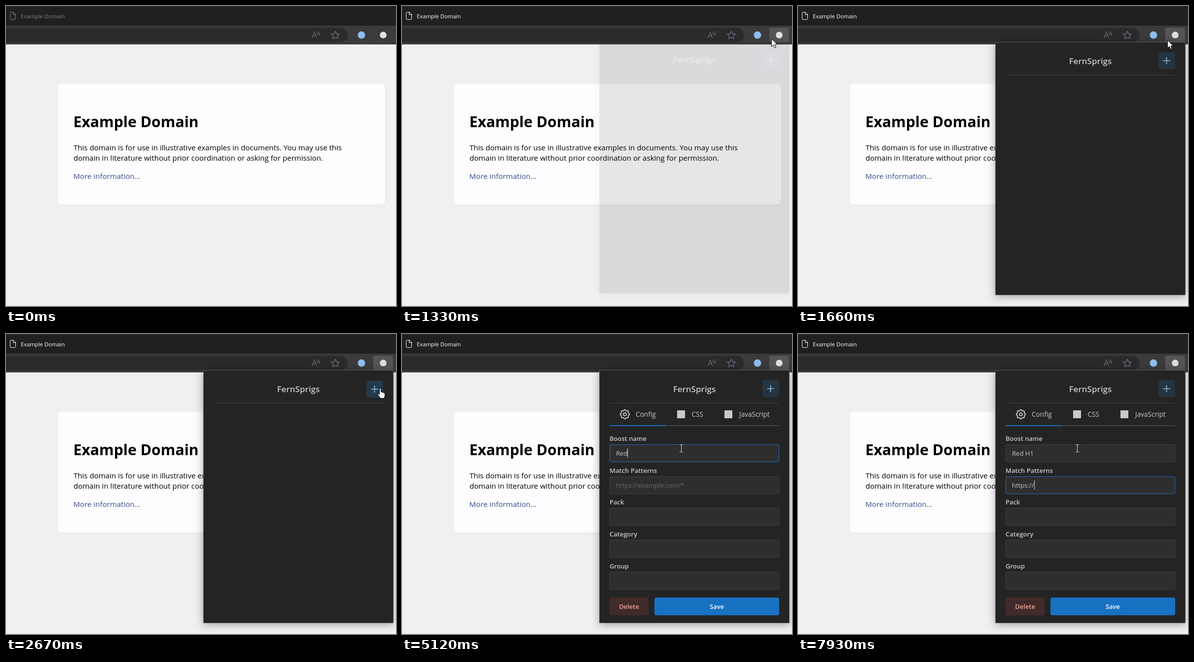
An HTML page with a canvas for the animation above (7.99 s loop, 791 by 609 pixels).

```html
<!DOCTYPE html>
<html lang="en">
<head>
<meta charset="utf-8">
<title>Example Domain</title>
<style>
html, body { margin: 0; width: 791px; height: 609px; overflow: hidden; background: #f0f0f2; }
canvas { display: block; }
</style>
</head>
<body>
<canvas id="stage" width="791" height="609"></canvas>
<script>
const W = 791, H = 609, LOOP = 7990;
const stage = document.getElementById('stage').getContext('2d');
const popup = document.createElement('canvas');
popup.width = W;
popup.height = H;
const pop = popup.getContext('2d');

const LIGHT = '#c9c9c9', LINE = '#424242', BLUE = '#1971c2';

// The picture only changes at these moments
const span = (a, b, n) => Array.from({ length: n }, (_, i) => a + (b - a) * i / (n - 1));
const TICKS = [
  0, ...span(650, 1060, 7),
  1250, 1330, 1400, 1450, ...span(1530, 2000, 8),
  ...span(2070, 2670, 8), 2730, 2790,
  ...span(2870, 3590, 12), 3670, 3730, 3790, 6140, 6190
];
const NAME_KEYS = [4720, 5000, 5120, 5260, 5520, 5800];
const URL_KEYS = [6650, 6790, 6930, 7130, 7270, 7470, 7730, 7930];

// Pointer path: time, x, y
const PATH = [
  [640, 796, 72], [1060, 749, 67], [1330, 749, 66], [1450, 748, 66], [1530, 748, 67],
  [1930, 757, 97], [2330, 756, 107], [2590, 759, 110], [2730, 759, 110],
  [2790, 752, 106], [3590, 566, 232]
];

const snap = t => TICKS.reduce((last, k) => k <= t ? k : last, 0);
const ramp = (t, a, b) => Math.min(1, Math.max(0, (t - a) / (b - a)));
const ease = p => p * p * (3 - 2 * p);
const typed = (str, keys, t) => str.slice(0, keys.filter(k => k <= t).length);

function mix(a, b, p) {
  const part = (c, i) => parseInt(c.slice(i, i + 2), 16);
  const ch = i => Math.round(part(a, i) + (part(b, i) - part(a, i)) * p);
  return `rgb(${ch(1)},${ch(3)},${ch(5)})`;
}

function pointerAt(t) {
  const last = PATH[PATH.length - 1];
  if (t >= last[0]) return { x: last[1], y: last[2] };
  const i = Math.max(1, PATH.findIndex(k => k[0] > t));
  const [t0, x0, y0] = PATH[i - 1], [t1, x1, y1] = PATH[i];
  const p = ease(ramp(t, t0, t1));
  return { x: Math.round(x0 + (x1 - x0) * p), y: Math.round(y0 + (y1 - y0) * p) };
}

function text(c, str, x, y, size, color, weight = 400, align = 'left') {
  c.font = `${weight} ${size}px "Open Sans", "Noto Sans", sans-serif`;
  c.textAlign = align;
  c.fillStyle = color;
  c.fillText(str, x, y);
}

function rect(c, x, y, w, h, color, r = 0) {
  c.beginPath();
  c.roundRect(x, y, w, h, r);
  c.fillStyle = color;
  c.fill();
}

function disc(c, x, y, r, color) {
  c.beginPath();
  c.arc(x, y, r, 0, Math.PI * 2);
  c.fillStyle = color;
  c.fill();
}

function stroke(c, path, color, width = 1, x = 0, y = 0) {
  c.save();
  c.translate(x, y);
  c.strokeStyle = color;
  c.lineWidth = width;
  c.lineJoin = 'round';
  c.stroke(new Path2D(path));
  c.restore();
}

// Closed outline from a radius function
function polar(n, radius) {
  const pts = span(0, n, n + 1).map(i => {
    const a = i / n * Math.PI * 2 - Math.PI / 2, r = radius(i, a);
    return `${(r * Math.cos(a)).toFixed(2)} ${(r * Math.sin(a)).toFixed(2)}`;
  });
  return 'M' + pts.join('L') + 'Z';
}
const STAR = polar(10, i => i % 2 ? 4.2 : 8.6);
const GEAR = polar(96, (i, a) => 8.5 + 0.9 * Math.cos(8 * a));
const RING = polar(32, () => 3);

function drawBrowser(c, t) {
  const active = t >= 650;
  const tabColor = active ? '#ffffff' : '#838383';
  rect(c, 0, 0, W, 40, '#202020');
  rect(c, 0, 0, W, 1, '#333333');
  rect(c, 0, 40, W, 40, '#3b3b3b');
  rect(c, -20, 44, 713, 30, '#2b2b2b', 15);

  stroke(c, 'M8.5 14.5Q8.5 12.5 10.5 12.5H15L19.5 17V25.5Q19.5 27.5 17.5 27.5H10.5Q8.5 27.5 8.5 25.5ZM14.5 12.5V17.5H19.5', tabColor);
  text(c, 'Example Domain', 30, 25, 11.25, tabColor);

  text(c, 'A', 620.5, 65, 16, '#8790a0', 300);
  stroke(c, 'M630.5 54Q633 56 631.5 59M632.5 51.5Q637.5 55 634.5 60', '#8790a0');
  stroke(c, STAR, '#737f98', 1.1, 668, 59.5);

  disc(c, 721, 59, 7.5, '#8fbcf0');
  const p = pointerAt(t);
  if (t >= 1250 || (active && p.x < 785)) rect(c, 745, 44, 40, 30, '#555555', 4);
  disc(c, 765, 59, 6.8, '#dfdfe6');
}

function drawPage(c) {
  rect(c, 0, 78, W, H, '#f0f0f2', [2, 0, 0, 0]);
  c.save();
  c.shadowColor = 'rgba(0,0,0,.03)';
  c.shadowBlur = 9;
  c.shadowOffsetX = 2;
  c.shadowOffsetY = 3;
  rect(c, 105, 158, 664, 245, '#fdfdff', 8);
  c.restore();
  text(c, 'Example Domain', 136.5, 246, 30.2, '#000', 700);
  text(c, 'This domain is for use in illustrative examples in documents. You may use this', 137, 293, 15.05, '#000');
  text(c, 'domain in literature without prior coordination or asking for permission.', 137, 314, 15.05, '#000');
  text(c, 'More information...', 136.5, 351, 15.05, '#384f8d');
}

function drawField(c, label, y, focus) {
  text(c, label, 421, y - 7, 13, LIGHT, 600);
  rect(c, 421, y, 344, 36, mix(LINE, BLUE, focus), 4);
  rect(c, 422, y + 1, 342, 34, '#2e2e2e', 3);
}

function drawEntry(c, str, y, caret) {
  text(c, str, 434, y + 23, 13.1, LIGHT);
  if (caret) rect(c, Math.round(434 + c.measureText(str).width), y + 8, 1, 19, '#d8d8d8');
}

function drawForm(c, t) {
  stroke(c, GEAR, LIGHT, 1.9, 452, 163);
  stroke(c, RING, LIGHT, 1.9, 452, 163);
  rect(c, 558, 155, 16, 16, LIGHT);
  rect(c, 654, 155, 16, 16, LIGHT);
  text(c, 'Config', 474, 168, 13.6, LIGHT);
  text(c, 'CSS', 587.5, 168, 13.6, LIGHT);
  text(c, 'JavaScript', 684, 168, 13.6, LIGHT);
  rect(c, 421, 185, 344, 2, LINE);
  rect(c, 421, 185, 114, 2, BLUE);

  const s = snap(t), next = ramp(s, 6090, 6190);
  drawField(c, 'Boost name', 224, ramp(s, 3610, 3790) * (1 - next));
  drawField(c, 'Match Patterns', 289, next);
  drawField(c, 'Pack', 353, 0);
  drawField(c, 'Category', 418, 0);
  drawField(c, 'Group', 483, 0);

  const caretOn = (t >= 3670 && t < 4270) || (t >= 4720 && t < 6140);
  drawEntry(c, typed('Red H1', NAME_KEYS, t), 224, caretOn);
  if (t < URL_KEYS[0]) text(c, 'https://example.com/*', 434, 312, 13.1, '#696969');
  drawEntry(c, typed('https://', URL_KEYS, t), 289, t >= 6140);

  rect(c, 421, 535, 79, 36, '#432a2a', 4);
  text(c, 'Delete', 460.5, 558, 13, '#eba597', 600, 'center');
  rect(c, 512, 535, 253, 36, BLUE, 4);
  text(c, 'Save', 638.5, 558, 13, '#fff', 600, 'center');
}

function drawPopup(c, t) {
  c.clearRect(0, 0, W, H);
  c.save();
  c.shadowColor = 'rgba(0,0,0,.34)';
  c.shadowBlur = 16;
  c.shadowOffsetY = 3;
  rect(c, 400, 73, 386, 514, '#5c5c5c');
  c.restore();
  rect(c, 401, 74, 384, 512, '#242424');

  text(c, 'FernSprigs', 593, 118, 17, LIGHT, 600, 'center');
  const hover = t >= 1930 && t < 2930;
  const y = t >= 2590 && t < 2730 ? 95 : 94;
  rect(c, 731, y, 34, 34, hover ? '#243a4b' : '#243441', 4);
  stroke(c, 'M-7 0H7M0 -7V7', '#93bfe4', 1.6, 747.5, y + 17);
  rect(c, 421, 140, 344, 1, LINE);
  if (t >= 2730) drawForm(c, t);
}

const ARROW = new Path2D('M.5 .5V16.5L4.2 13L6.7 18.8L9.4 17.6L7 12H12Z');
const HAND = new Path2D('M-1.5 1.5Q0 -1 1.5 1.5V8Q3 6.5 4.3 8.5Q6 7.5 7 9.5Q9 8.5 9.5 11V15Q9.5 17 7.5 20.5H0Q-1.5 17 -5 13Q-6 10.5 -3.5 11L-1.5 13Z');

function drawPointer(c, t) {
  if (t < 650) return;
  const { x, y } = pointerAt(t);
  const overButton = t >= 1930 && t < 2930;
  const overTabs = t >= 2870 && y >= 141 && y < 187;
  if (t > 2870 && y >= 224) {
    stroke(c, 'M-3 -7.5H-1L.5 -6.5L2 -7.5H4M.5 -6.5V6.5M-3 7.5H-1L.5 6.5L2 7.5H4', '#e4e4e4', 1, x, y);
    return;
  }
  const shape = overButton || overTabs ? HAND : ARROW;
  c.save();
  c.translate(x, y);
  c.fillStyle = '#fff';
  c.strokeStyle = '#000';
  c.lineWidth = 1;
  c.lineJoin = 'round';
  c.fill(shape);
  c.stroke(shape);
  c.restore();
}

function draw(t) {
  const s = snap(t);
  drawBrowser(stage, s);
  drawPage(stage);
  const shown = ramp(s, 1313, 1482);
  if (shown > 0) {
    drawPopup(pop, t);
    stage.globalAlpha = shown;
    stage.drawImage(popup, 0, Math.round(-3.3 * (1 - shown)));
    stage.globalAlpha = 1;
  }
  drawPointer(stage, s);
}

const start = performance.now();
function loop() {
  draw((performance.now() - start) % LOOP);
  requestAnimationFrame(loop);
}
loop();
</script>
</body>
</html>
```
